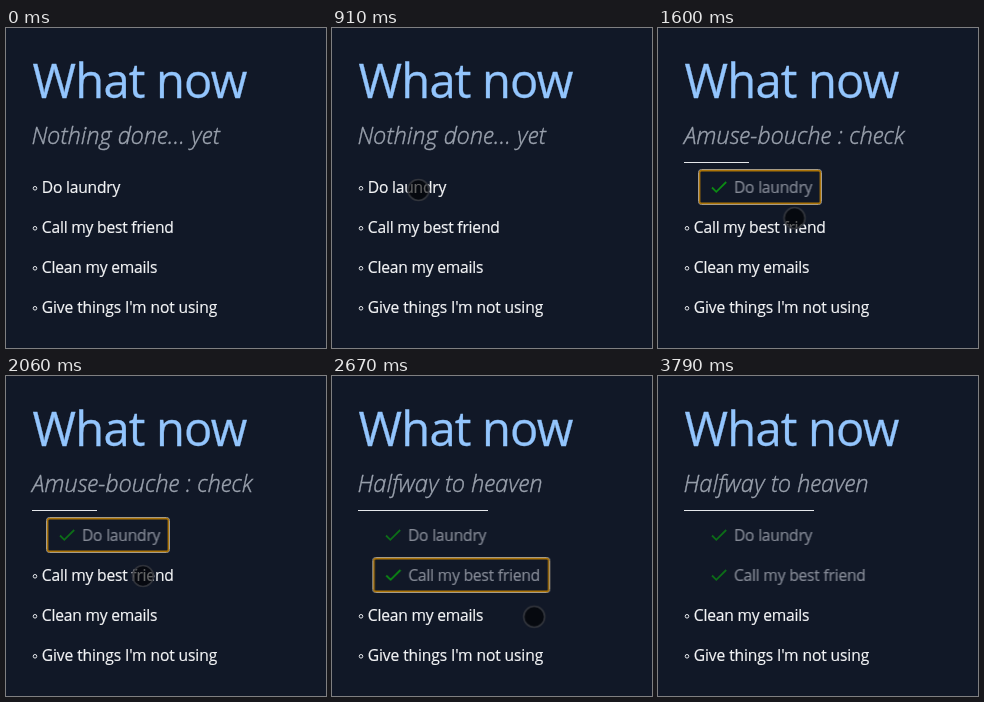
Write an HTML page that moves like this. It is 320 px wide and 320 px high and loops after 3920 ms.

```html
<!DOCTYPE html>
<html lang="en">
<head>
<meta charset="utf-8">
<title>What now</title>
<style>
  html, body { margin: 0; width: 100%; height: 100%; overflow: hidden; background: #111827; }
  svg { display: block; width: 100vw; height: 100vh; }
  text { font-family: "Open Sans", "Noto Sans", sans-serif; white-space: pre; }
  svg * { animation: 3920ms linear infinite; }

  .title { font-size: 47px; letter-spacing: -.78px; fill: #93c5fd; stroke: #93c5fd; stroke-width: .3; }
  .sub { font-size: 23.6px; letter-spacing: .06px; font-weight: 300; font-style: italic; fill: #9ca3af; stroke: #9ca3af; stroke-width: .4; }
  .item { font-size: 15.6px; letter-spacing: -.2px; fill: #f3f4f6; stroke: #f3f4f6; stroke-width: .2; }
  .dot { fill: none; stroke: #e5e7eb; stroke-width: 1; }
  .bar { fill: #e5e7eb; }
  .check { fill: none; stroke: #0c8a14; stroke-width: 1.8; }
  .halo { fill: none; stroke: #a4a8b0; }
  .ring { fill: none; stroke: #ac7408; stroke-width: 1.6; }
  .tap { fill: #33b5e5; opacity: 0; }
  .cursor circle { fill: rgba(0, 0, 0, .6); stroke: #33363d; stroke-width: 1.6; }

  /* hard switches */
  .s0, .s1, .s2, .todo1, .todo2, .done1, .done2, .focus1, .focus2 { animation-timing-function: step-end; }
  .s0, .todo1 { animation-name: until1; }
  .s1, .focus1 { animation-name: between; }
  .s2, .done2 { animation-name: from2; }
  .todo2 { animation-name: until2; }
  .done1 { animation-name: from1; }
  .focus2 { animation-name: focus2; }
  @keyframes until1 { 0% { opacity: 1 } 26.786%, 100% { opacity: 0 } }
  @keyframes until2 { 0% { opacity: 1 } 58.673%, 100% { opacity: 0 } }
  @keyframes from1 { 0% { opacity: 0 } 26.786%, 100% { opacity: 1 } }
  @keyframes from2 { 0% { opacity: 0 } 58.673%, 100% { opacity: 1 } }
  @keyframes between { 0% { opacity: 0 } 26.786% { opacity: 1 } 58.673%, 100% { opacity: 0 } }
  @keyframes focus2 { 0% { opacity: 0 } 58.673% { opacity: 1 } 96.684%, 100% { opacity: 0 } }

  /* indent with a pull back first */
  .slide1 { animation-name: slide1; }
  .slide2 { animation-name: slide2; }
  @keyframes slide1 {
    0% { transform: translateX(-20.5px) }
    26.786% { transform: translateX(-20.5px); animation-timing-function: cubic-bezier(.6, -.9, .4, 1.3) }
    38.265%, 100% { transform: none }
  }
  @keyframes slide2 {
    0% { transform: translateX(-20.5px) }
    58.673% { transform: translateX(-20.5px); animation-timing-function: cubic-bezier(.6, -.9, .4, 1.3) }
    70.153%, 100% { transform: none }
  }

  .fade1 { animation-name: fade1; }
  .fade2 { animation-name: fade2; }
  @keyframes fade1 {
    0%, 26.786% { fill: #f3f4f6; stroke: #f3f4f6 }
    31.6%, 100% { fill: #868b97; stroke: #868b97 }
  }
  @keyframes fade2 {
    0%, 58.673% { fill: #f3f4f6; stroke: #f3f4f6 }
    63.5%, 100% { fill: #868b97; stroke: #868b97 }
  }

  .check1 { animation-name: check1; }
  .check2 { animation-name: check2; }
  @keyframes check1 { 0%, 26.786% { opacity: .4 } 31%, 41% { opacity: 1 } 46%, 100% { opacity: .75 } }
  @keyframes check2 { 0%, 58.673% { opacity: .4 } 63%, 73% { opacity: 1 } 78%, 100% { opacity: .75 } }

  .tap1 { animation-name: tap1; }
  .tap2 { animation-name: tap2; }
  @keyframes tap1 { 0%, 26.78% { opacity: 0 } 26.786%, 32.7% { opacity: .4 } 35.2%, 100% { opacity: 0 } }
  @keyframes tap2 { 0%, 58.67% { opacity: 0 } 58.673%, 64.5% { opacity: .4 } 67%, 100% { opacity: 0 } }

  .cursor { animation-name: travel; }
  .cursor circle { animation-name: press; }
  @keyframes travel {
    0%, 5.6% { transform: translate(304px, 340px) }
    5.612% { transform: translate(304px, 319px) }
    10.2% { transform: translate(284px, 266px) }
    14.031% { transform: translate(242.5px, 216.5px) }
    16.327% { transform: translate(174px, 181px) }
    18.622% { transform: translate(107px, 163px) }
    21.684%, 33.2% { transform: translate(86.5px, 162px) }
    37% { transform: translate(116px, 174px) }
    40.816% { transform: translate(136.5px, 190px) }
    44.643% { transform: translate(137px, 198px) }
    47.959%, 65.306% { transform: translate(137px, 200px) }
    68.112% { transform: translate(202px, 240.5px) }
    72.704% { transform: translate(246px, 280px) }
    78.571% { transform: translate(272px, 308px) }
    81.1% { transform: translate(277px, 317px) }
    81.122%, 100% { transform: translate(277px, 340px) }
  }
  @keyframes press {
    0%, 24.2% { transform: none; opacity: 1; stroke-opacity: 1 }
    26.5%, 32.5% { transform: scale(.92); opacity: .8; stroke-opacity: .3 }
    34%, 52.3% { transform: none; opacity: 1; stroke-opacity: 1 }
    56.5%, 63.5% { transform: scale(.92); opacity: .8; stroke-opacity: .3 }
    65%, 100% { transform: none; opacity: 1; stroke-opacity: 1 }
  }
</style>
</head>
<body>
<svg viewBox="0 0 320 320">
  <text class="title" x="26.6" y="70">What now</text>

  <text class="sub s0" x="25.5" y="116">Nothing done... yet</text>
  <g class="s1">
    <text class="sub" x="26" y="116">Amuse-bouche : check</text>
    <rect class="bar" x="26" y="134" width="65" height="1"/>
  </g>
  <g class="s2">
    <text class="sub" x="25.5" y="116">Halfway to heaven</text>
    <rect class="bar" x="26" y="134" width="130" height="1"/>
  </g>

  <g class="todo1">
    <circle class="dot" cx="29" cy="160.3" r="1.8"/>
    <text class="item" x="35.8" y="165">Do laundry</text>
  </g>
  <g class="todo2">
    <circle class="dot" cx="29" cy="200.3" r="1.8"/>
    <text class="item" x="35.8" y="205">Call my best friend</text>
  </g>
  <circle class="dot" cx="29" cy="240.3" r="1.8"/>
  <text class="item" x="35.8" y="245">Clean my emails</text>
  <circle class="dot" cx="29" cy="280.3" r="1.8"/>
  <text class="item" x="35.8" y="285" style="letter-spacing:-.11px">Give things I'm not using</text>

  <g class="done1"><g class="slide1">
    <path class="check check1" d="M54 159.5l4.3 4.3L68.2 154"/>
    <text class="item fade1" x="75.9" y="165">Do laundry</text>
    <g class="focus1">
      <rect class="halo" x="40.5" y="141.5" width="123" height="35" rx="3"/>
      <rect class="ring" x="41.6" y="142.6" width="120.8" height="32.8" rx="2"/>
    </g>
    <rect class="tap tap1" x="41" y="142" width="122" height="34" rx="3"/>
  </g></g>
  <g class="done2"><g class="slide2">
    <path class="check check2" d="M54 199.5l4.3 4.3L68.2 194"/>
    <text class="item fade2" x="75.9" y="205">Call my best friend</text>
    <g class="focus2">
      <rect class="halo" x="40.5" y="181.5" width="177" height="35" rx="3"/>
      <rect class="ring" x="41.6" y="182.6" width="174.8" height="32.8" rx="2"/>
    </g>
    <rect class="tap tap2" x="41" y="182" width="176" height="34" rx="3"/>
  </g></g>

  <g class="cursor"><circle r="10.5"/></g>
</svg>
</body>
</html>
```
